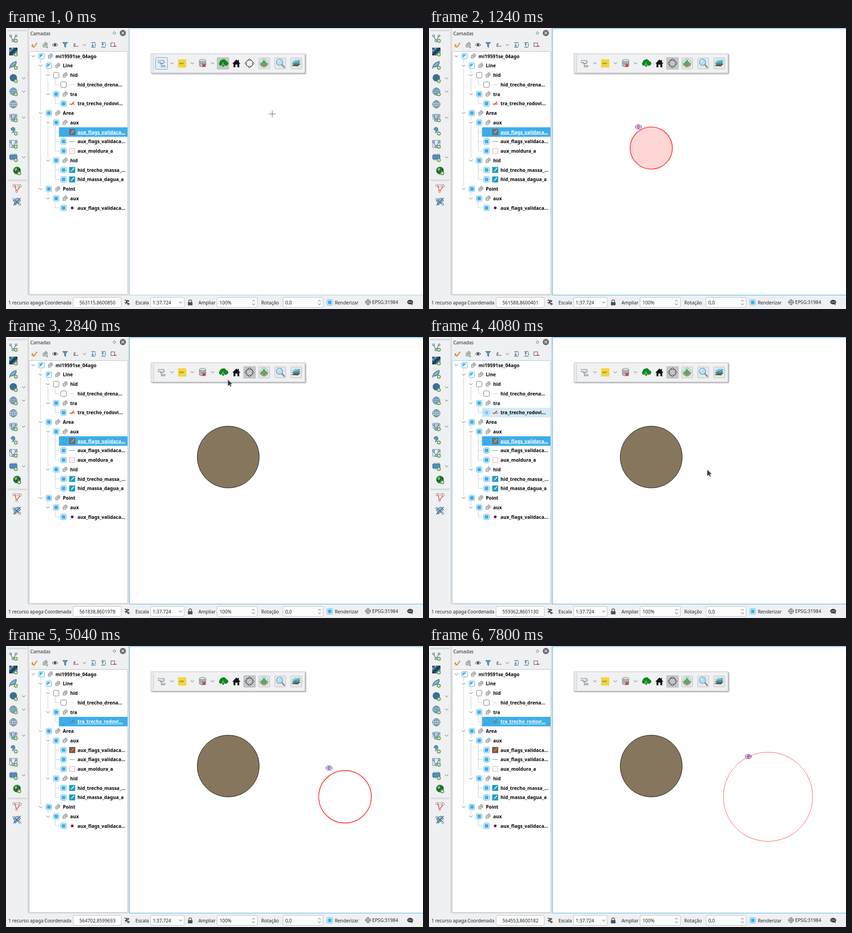
An HTML page for the animation above (7.84 s loop, 910 by 615 pixels).

```html
<!DOCTYPE html>
<html lang="pt">
<head>
<meta charset="utf-8">
<title>Camadas</title>
<style>
html, body { margin: 0; width: 100%; height: 100%; overflow: hidden; background: #eff0f1; }
svg { display: block; }
text { font: 10.2px "Noto Sans", sans-serif; fill: #232629; }
.b { font-weight: 700; font-size: 10.35px; fill: #000; }
.tiny { font-size: 5px; }
</style>
</head>
<body>
<svg id="stage" width="910" height="615" viewBox="0 0 910 615"></svg>
<script>
const LOOP = 7840, STEP = 40, ROW = 20.75;
const BLUE = '#3daee9', HOVER = '#93cee9', INK = '#31363b', GREY = '#bcc2c6', SLATE = '#3c6280';

const path = (d, stroke = INK, w = 1, fill = 'none') =>
  `<path d="${d}" fill="${fill}" stroke="${stroke}" stroke-width="${w}"/>`;
const rect = (x, y, w, h, fill, stroke = 'none', r = 0) =>
  `<rect x="${x}" y="${y}" width="${w}" height="${h}" rx="${r}" fill="${fill}" stroke="${stroke}"/>`;
const circle = (x, y, r, fill, stroke = 'none', w = 1) =>
  `<circle cx="${x}" cy="${y}" r="${r}" fill="${fill}" stroke="${stroke}" stroke-width="${w}"/>`;
const text = (x, y, s, attrs = '') => `<text x="${x}" y="${y}" ${attrs}>${s}</text>`;
const at = (x, y, s) => `<g transform="translate(${x} ${y})">${s}</g>`;
const chevron = (x, y, s = 3.5, dir = 1) =>
  path(`M${x - s} ${y - s / 2 * dir}l${s} ${s * dir}l${s} ${-s * dir}`, '#4d5257', 1);
const plus = (x, y) => at(x, y, circle(0, 0, 4.3, '#5b9b3f') + path('M-2.8 0h5.6M0-2.8v5.6', '#fff', 1.5));

// Icons, each centred on the origin
const vee = (c = SLATE) => path('M-6-5L-1 6L6-5', c, 1.2) +
  [[-6, -5], [-1, 6], [6, -5]].map(([x, y]) => circle(x, y, 2, '#eef5f8', c, 1.1)).join('');
const globe = (c, line, r = 8) => circle(0, 0, r, c, line, 1) +
  path(`M${-r} 0h${2 * r}M0 ${-r}v${2 * r}M${-r * .8} ${-r / 2}h${r * 1.6}M${-r * .8} ${r / 2}h${r * 1.6}`, line, .9) +
  `<ellipse rx="${r / 2}" ry="${r}" fill="none" stroke="${line}"/>`;
const pages = path('M-4-1.5h5v6h-5zM-2-3.5h5v6M0-5.5h3l2 2v5', '#565c61', .9) + path('M-2 0v3M-2 1h2', '#565c61', .7);
const checker = () => {
  let s = rect(-9, -9, 18, 17, '#2d5875');
  for (let i = 0; i < 16; i++) if ((i + (i >> 2)) % 2)
    s += rect(-9 + i % 4 * 4.5, -9 + (i >> 2) * 4.25, 4.5, 4.25, i % 3 ? '#6c9dbb' : '#16374e');
  return s;
};
const pencil = c => path('M-3.5 4.5L-2 1L3-5l2 1.5L-.5 2.5z', 'none', 0, c);

function leftBar() {
  const blob = path('M-8 8q0-12 14-16q2 10-12 13', '#2d5875', 1.2, '#84b4d0');
  const items = [
    [22, vee()], [52, checker()], [81, blob],
    [110, circle(0, -1, 8, '#3b6e97'), 1],
    [139, globe('#a9c9dd', '#47769a'), 1], [167, globe('#f3f8fb', '#1f5576')],
    [196, globe('#dce9f1', '#7da1b8') + vee(), 1],
    [225, path('M-5-5q4-5 8-1q3 7-6 11q4-5 1-6q-4 0-3-4z', '#2d6287', .8, '#5b96bd')],
    [254, rect(-8, -8, 16, 15, '#e3edf2', '#6b8797') + vee()],
    [283, path('M-5-8v15M-1-8v15M3-8v15M6-8v15', '#677279', 1.2) + rect(-8, -5, 16, 9, '#4c8fc5', '#2e628b', 1), 1]
  ];
  let s = path('M3 4.5h42M3 6.5h42M3 332.5h42M3 334.5h42', '#c6c9cb') + path('M47.5 0v585', '#c8cbcd');
  for (const [y, icon, menu] of items) {
    s += at(16, y, icon);
    if (y !== 167) s += plus(21.5, y + 6);
    if (menu) s += chevron(38.5, y);
  }
  s += at(24, 312, globe('#173226', '#43a955') + path('M-6-4l5-2l2 4l-5 4zM2 1l4 1l-3 4z', 'none', 0, '#65c957')) + plus(29, 318);
  s += at(24, 350, path('M-9-7H7v4H-9z', '#8b9297', 1, '#f4f4f4') + path('M-5-6L-1 8L8-5', '#d34141', 1.4) +
    circle(-1, 8, 2, '#fff', '#d34141') + circle(7, -4, 2.5, '#fff', '#d34141'));
  s += at(24, 380, path('M-8-4L3-8L8-2L-4 8z', '#315d7b', 1, '#9fc0d5') + path('M-8 8L8-8M-7-5L6 6', '#315d7b', 1.5) +
    circle(-7, -5, 2.2, '#fff', '#315d7b') + circle(6, 6, 2.2, '#fff', '#315d7b'));
  return s;
}

function panelHead() {
  const box = path('M-5-4.5h8v8h-8z', '#4d5257', 1.1);
  const arrows = d => path('M-5-5h9M-5 5h9', INK, 1.1) + path(`M-2 ${-3 * d}v${6 * d}l-2 ${-2 * d}m2 ${2 * d}l2 ${-2 * d}M4 ${-3 * d}v${6 * d}`, '#2980b9', 1.3);
  return text(53, 16, 'Camadas') + path('M236.5 8l3.2 3.2l-3.2 3.2l-3.2-3.2z', '#4d5257') +
    circle(255, 11, 6.7, '#61666b') + path('M252 8l6 6M258 8l-6 6', '#fff', 1.2) +
    at(62, 37, path('M-5 0l4 4l6-9l1 1l-6 9q-4 1-6-3z', '#c87425', .8, '#f39c32') + path('M-5 0l2-1', '#e9432f', 1.5)) +
    at(85, 37, pages) + path('M87 42h5M89.500 39.500v5', '#3c9a3b', 1.2) +
    at(107, 37, path('M-6 0Q0-7 6 0Q0 6-6 0z', INK, 1) + circle(0, -.3, 2.3, INK)) +
    path('M123.500 31.500h11l-4.200 5v6l-2.600-1.500v-4.500z', '#3f6f91', 1, '#4f9bd1') +
    text(147, 40.5, 'ε', 'style="font-size:12px"') + path('M153 40h5', '#d33', 1.3) + chevron(171, 37) +
    at(191, 37, arrows(1)) + at(213, 37, arrows(-1)) +
    at(234, 37, box) + path('M235 40h6', '#d83c3c', 2);
}

function toolbar(tool, focusFirst) {
  let s = '<g filter="url(#shade)">' + rect(316.5, 56.5, 336, 42, '#f0f1f2', '#bfc1c2') + '</g>' + path('M320.500 59v37M322.500 59v37', '#cfd1d2');
  if (focusFirst) s += rect(326.5, 64.5, 26, 26, '#e3eef5', BLUE, 2);
  s += rect(tool === 'cloud' ? 460 : 518, 64, 27, 27, '#c3c5c6', 'none', 2);
  for (const x of [551.5, 586.5, 621.5]) s += rect(x, 65.5, 24, 24, '#e6e8e9', '#babdbf', 1);
  s += at(339, 77, text(-8, -4, 'dados', 'class="tiny" style="fill:#777"') +
    path('M-8-2L5 1M-3-2L2 8M4-6l3 4l-7 4', '#8b8e90', 1.4) + path('M-1 8h9v-3h-6z', '#777', 1, '#ddd')) + chevron(362, 77);
  s += rect(375.5, 68.5, 18, 18, '#f6d33d') + text(378, 79, 'attr', 'class="tiny" style="fill:#438c2b;font-weight:700;font-size:5.5px"') + chevron(406.5, 77);
  s += at(429, 77, path('M-7-6v12q7 4 14 0V-6', '#7c8285', 1, '#b3b7b9') + '<ellipse cy="-6" rx="7" ry="2.500" fill="#e0e2e3" stroke="#7c8285"/>' +
    path('M-7-1q7 4 14 0', '#7c8285') + path('M0 2l6 6M6 2l-6 6', '#cf2929', 2.2)) + chevron(451, 77);
  s += at(474, 77, path('M-6 5a4 4 0 0 1-1-7a5 5 0 0 1 5-5a5 5 0 0 1 8 3a4.500 4.500 0 0 1 0 9z', '#056f13', 1, '#078b19') +
    path('M0-1v5h4l-4 5l-4-5h3v-5z', '#d7e9d7', .7, '#087c16'));
  s += path('M494 78l8.800-9l3 3v-2h2.400v4.500l3.500 3.500h-2.700v8h-4v-6h-4.500v6h-4v-8z', 'none', 0, '#141414');
  s += circle(531.3, 77.3, 7.6, 'none', '#222', 1.2) +
    [[0, -8], [8, 0], [0, 8], [-8, 0]].map(([x, y]) => circle(531.3 + x, 77.3 + y, 1.8, '#fff', '#222', 1)).join('');
  s += at(563, 77, circle(0, 0, 9, '#e2eef0', '#7c999c') + path('M-8 2L0-7L8 2L0 7z', '#637c4b', .8, '#58a86c') + path('M-8 3l8 4l8-4v2l-8 4l-8-4z', 'none', 0, '#cf9141'));
  s += at(598, 76, circle(-1, -1, 6.8, '#b9def5', '#6da4cb', 1.6) + path('M4 4l6 7', '#7b898f', 2.8) + path('M-5-2q1-3 4-4', '#fff', 1.5));
  s += at(633, 77, path('M-10 6l7-5h13l-6 6z', 'none', 0, '#555') + path('M-10 2l7-5h13l-6 6z', 'none', 0, '#4a9b73') + path('M-9-2l7-5H10l-6 6z', 'none', 0, '#4fa9df') + path('M-5-2q5-5 9-3', '#c2e8fa', 1.3));
  return s;
}

function statusBar() {
  const field = (x, w) => rect(x + .5, 589.5, w, 22, '#fcfcfc', '#bcbfc1', 2.5);
  const spin = x => chevron(x, 597, 3, -1) + chevron(x, 604.5, 3);
  return text(5, 604.5, '1 recurso apaga') + text(84, 604.5, 'Coordenada') + field(146, 105) +
    at(264, 600, path('M-5-5l4 2l1 5l5 2M-3 4l3-8l5 1M-5 1l9-3', INK, 1.5) + circle(3, 4, 2, 'none', INK, 1.2)) +
    text(282.5, 604.5, 'Escala') + field(315, 73.5) + text(320, 604.5, '1:37.724') + chevron(381, 600.5) +
    rect(397, 600, 10, 7, '#4d5257', 'none', 1) + path('M399 600v-2a3 3 0 0 1 6 0v2', '#4d5257', 1.5) +
    text(420, 604.5, 'Ampliar') + field(460, 88) + text(466, 604.5, '100%') + spin(540) +
    text(557, 604.5, 'Rotação') + field(604, 87.5) + text(609.5, 604.5, '0,0') + spin(684) +
    checkbox(706.5, 600.5, 'on') + text(717.5, 604.5, 'Renderizar') +
    at(790, 600, circle(0, 0, 5, '#d9dadb', '#555a5e', 1.1) + path('M-7 0H7M0-7V7', '#555a5e')) + text(799, 604, 'EPSG:31984') +
    '<ellipse cx="882" cy="600" rx="6.500" ry="5" fill="#3b4045"/>' + path('M883 603l4 4v-5z', 'none', 0, '#3b4045') +
    [-3, 0, 3].map(d => circle(882 + d, 600, .9, '#fff')).join('');
}

function checkbox(x, y, state) {
  let s = rect(x - 6, y - 6, 12, 12, '#fff', state === 'off' ? '#6e7377' : BLUE, 2);
  if (state === 'on') s += rect(x - 4, y - 4, 8, 8, BLUE);
  if (state === 'part') s += path(`M${x - 4} ${y + 4}v-8h8z`, 'none', 0, BLUE);
  return s;
}

// depth, label, checkbox state, layer icon
const ROWS = [
  [0, 'mi19591se_04ago', 'part'], [1, 'Line', 'part'], [2, 'hid', 'off'],
  [3, 'hid_trecho_drena...', 'off', 'river'], [2, 'tra', 'on'], [3, 'tra_trecho_rodovi...', 'on', 'road'],
  [1, 'Area', 'on'], [2, 'aux', 'on'], [3, 'aux_flags_validaca...', 'on', 'flag'],
  [3, 'aux_flags_validaca...', 'on', 'green'], [3, 'aux_moldura_a', 'on', 'frame'], [2, 'hid', 'on'],
  [3, 'hid_trecho_massa_...', 'on', 'water'], [3, 'hid_massa_dagua_a', 'on', 'water'],
  [1, 'Point', 'on'], [2, 'aux', 'on'], [3, 'aux_flags_validaca...', 'on', 'point']
];
const LAYER = {
  river: () => path('M-6 0H6', '#a6d8f2'),
  green: () => path('M-6 0H6', '#5ec454', 1.2),
  road: sel => path('M-6 1H6', sel ? '#777' : '#9a2a18', 1.2) + pencil(sel ? '#777c80' : '#ef5a22'),
  flag: sel => rect(-6, -6, 12, 12, sel ? '#77716c' : '#795c49', sel ? '#555' : '#4a3c32') + pencil(sel ? '#aaa59f' : '#ef7a36'),
  frame: () => '<rect x="-5.500" y="-5.500" width="11" height="11" fill="#fff" stroke="#ef6b6b" stroke-dasharray="1.500 .7"/>',
  water: () => rect(-6.5, -6.5, 13, 13, '#159bd8') + pencil('#ffe36a'),
  point: () => circle(0, 0, 3, '#6b1259')
};
const rowY = i => 61.7 + i * ROW;

function tree(selected, hovered, border) {
  let s = rect(50.5, 51.5, 215, 531.5, '#fff', border, 2);
  const line = (x, a, b) => path(`M${x + .5} ${rowY(a) + 7}V${rowY(b)}`, '#c9cdd0');
  s += line(75, 0, 14) + line(91, 1, 4) + line(91, 6, 11) + line(91, 14, 15) +
    line(107, 2, 3) + line(107, 4, 5) + line(107, 7, 10) + line(107, 11, 13) + line(107, 15, 16);
  ROWS.forEach(([depth, label, state, icon], i) => {
    const x = 59.5 + depth * 16, y = rowY(i), sel = i === selected, over = i === hovered;
    if (sel || over) s += rect(x + 8, y - 10.4, 257 - x, ROW, sel ? BLUE : '#d4ebf8');
    if (icon) s += path(`M${x} ${y}h10`, '#c9cdd0');
    else s += rect(x - 5, y - 5, 10, 10, '#fff') + chevron(x, y);
    s += sel ? rect(x + 12, y - 6, 12, 12, BLUE, '#38a1d8', 2)
      : `<g opacity="${over ? .55 : 1}">${checkbox(x + 18, y, state)}</g>`;
    s += at(x + 37, y, icon ? LAYER[icon](sel) : pages);
    s += text(x + 48.5, y + 3.8, label, `class="b" ${sel ? 'style="fill:#fff;text-decoration:underline"' : ''}`);
  });
  return s;
}

// time, pointer x, pointer y, easting, northing
const POINTER = [
  [0, 581, 188, 563115, 8600850], [160, 581, 188, 563115, 8600850], [960, 531, 80, 562560, 8601940],
  [1040, 531, 80, 562560, 8601940], [1160, 485, 263, 561930, 8599920], [1240, 457, 216.5, 561588, 8600401],
  [1360, 450, 205, 561490, 8600640], [2200, 450, 205, 561490, 8600640], [2360, 472, 218, 561760, 8600480],
  [2560, 472, 218, 561760, 8600480], [2840, 484, 93, 561838, 8601978], [2960, 484, 93, 561838, 8601978],
  [3600, 200, 166, 559362, 8601130], [3880, 200, 166, 559362, 8601130], [4080, 607, 290, 559362, 8601130],
  [4640, 740, 330, 565085, 8599090], [4800, 740, 330, 565085, 8599090], [5040, 705, 267, 564702, 8599693],
  [5200, 692.5, 233, 564491, 8600294], [5360, 692.5, 233, 564491, 8600294], [5480, 697, 242, 564553, 8600182]
];
const RADIUS_1 = [[1160, 0], [1240, 46], [1360, 67.6]];
const RADIUS_2 = [[4800, 0], [5040, 57.4], [5200, 108], [5360, 108], [5480, 97.5]];

function sample(track, t) {
  const i = track.findIndex(k => k[0] > t);
  if (i < 0) return track[track.length - 1].slice(1);
  if (i === 0) return track[0].slice(1);
  const a = track[i - 1], b = track[i], u = (t - a[0]) / (b[0] - a[0]), e = u * u * (3 - 2 * u);
  return a.slice(1).map((v, k) => v + (b[k + 1] - v) * e);
}

const CURSOR = {
  cross: () => path('M-7.500 0h15M0-7.500v15', '#55595c', 1),
  arrow: () => path('M0 0V14.500l3.500-2.800l2.300 4l2.300-1.300l-2.200-3.900l4-.6z', '#d9dadb', .7, '#35393d'),
  capture: t => circle(-2, 0, 4.5, '#ffffffb0', '#2525e6', 1) + circle(2, 0, 4.5, 'none', '#2525e6', 1) +
    path('M-6 0H6M0-4V4', '#f03030', 1.1) + (t >= 7800 ? path('M-2-3l5 5M3-3l-5 5', '#f03030', 1) : ''),
  busy: t => `<g transform="rotate(${t % 1000 * .36 - 6600 % 1000 * .36})">` + circle(0, 0, 6.5, '#fff') +
    path('M-6.500 0a6.500 6.500 0 0 1 13 0', '#f08a30', 2) + path('M6.500 0a6.500 6.500 0 0 1-13 0', '#3daee9', 2) + '</g>'
};

function cursorKind(t, x, y) {
  if ((t >= 1920 && t < 2040) || (t >= 6600 && t < 6720)) return 'busy';
  const overBar = x > 316 && x < 653 && y > 56 && y < 99;
  if (overBar || x < 269 || (t >= 3880 && t < 4160)) return 'arrow';
  return t < 960 ? 'cross' : 'capture';
}

function shapes(t) {
  let s = '';
  if (t >= 1160) {
    const done = t >= 1960;
    s += circle(485, 262.7, sample(RADIUS_1, t)[0], done ? '#87765e' : '#ffd6d6', done ? '#111' : '#fa2d2d', done ? 1 : 1.6);
  }
  if (t >= 4840) s += circle(739.8, 330, sample(RADIUS_2, t)[0], 'none', '#fa2d2d', t >= 6680 ? .8 : 1.6);
  return s;
}

const stage = document.getElementById('stage');
stage.innerHTML = '<defs><filter id="shade" x="-5%" y="-20%" width="110%" height="150%"><feDropShadow dx="1.500" dy="1.500" stdDeviation="1.500" flood-opacity=".4"/></filter></defs>' +
  rect(0, 0, 910, 615, '#eff0f1') + leftBar() + path('M49.500 0v584.500h218V0', '#c6c9cb') + panelHead() + statusBar() +
  '<g id="tree"></g><g id="map"></g><g id="bar"></g><g id="coords"></g><g id="pointer"></g>';

const shown = {};
function put(id, markup) {
  if (shown[id] === markup) return;
  shown[id] = markup;
  document.getElementById(id).innerHTML = markup;
}

function draw(t) {
  const [x, y, east, north] = sample(POINTER, t);
  const frozen = t >= 3880 && t < 4160, inTree = frozen || x < 265;
  const hovered = frozen ? 5 : inTree ? Math.round((y - 61.7) / ROW) : -1;
  const treeFocus = t >= 4160 && t < 4880, mapFocus = t >= 1160 && !treeFocus;
  const kind = cursorKind(t, x, y);
  const mapBorder = mapFocus ? BLUE : kind === 'arrow' ? GREY : HOVER;
  put('tree', tree(t < 4160 ? 8 : 5, hovered, treeFocus ? BLUE : inTree ? HOVER : GREY));
  put('map', rect(269.5, 1.5, 642, 583, '#fff', mapBorder) + shapes(t));
  put('bar', toolbar(t < 920 ? 'cloud' : 'circle', t < 1160));
  put('coords', text(199.5, 604.5, `${Math.round(east)},${Math.round(north)}`, 'text-anchor="middle"'));
  put('pointer', at(x, y, CURSOR[kind](t)));
}

function tick() {
  const t = performance.now() % LOOP;
  draw(Math.floor(t / STEP) * STEP);
  requestAnimationFrame(tick);
}
tick();
</script>
</body>
</html>
```
